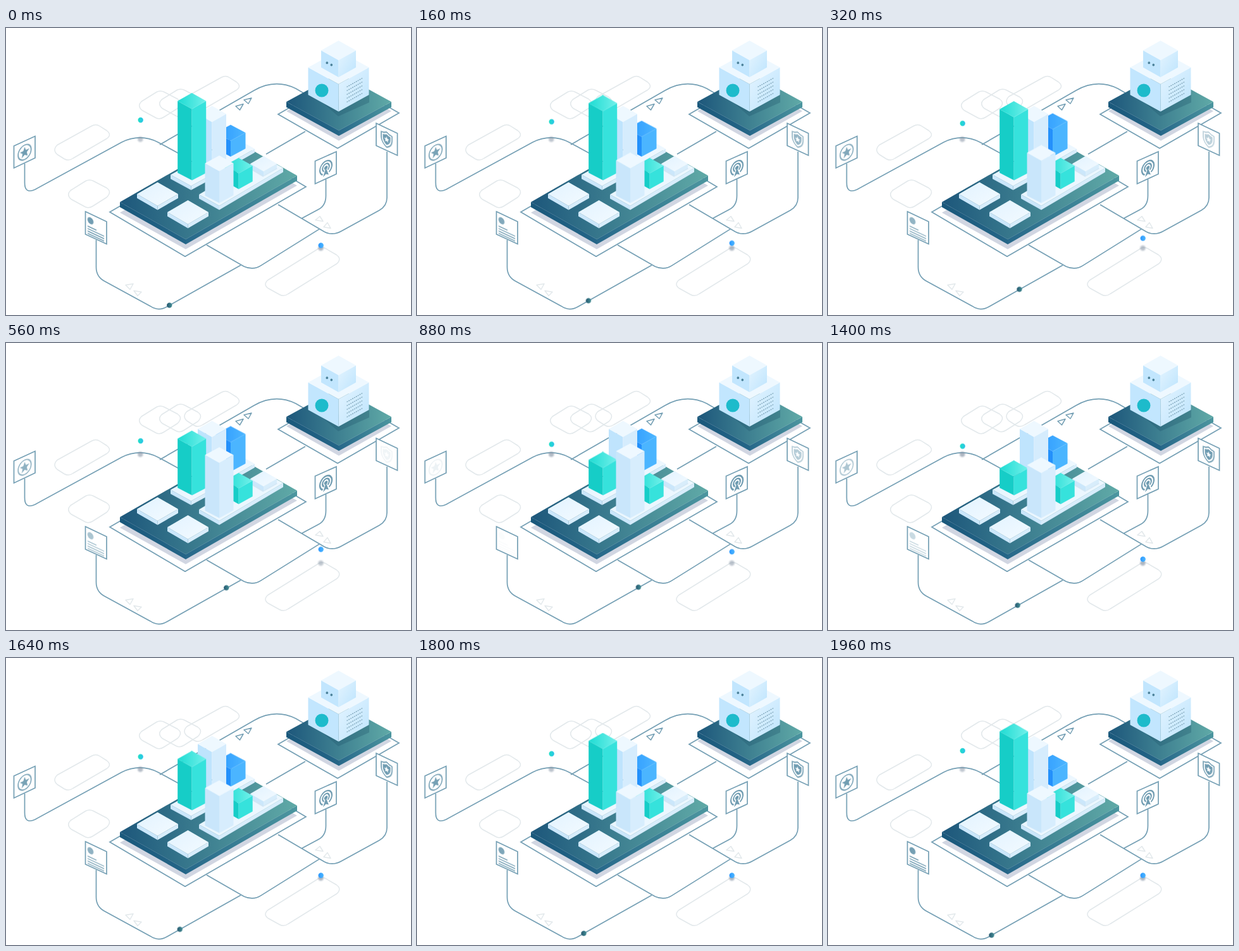
Animation, 640 px wide and 455 px high, one loop 2 s. Source, as an HTML page:

```html
<!DOCTYPE html>
<html lang="en">
<head>
<meta charset="utf-8">
<title>Isometric data platform</title>
<style>
html, body { margin: 0; width: 100%; height: 100%; overflow: hidden; background: #fff; }
svg { display: block; width: 640px; height: 455px; }
.wire { fill: none; stroke: #749fb4; stroke-width: 1.7; }
.panel { fill: #fff; stroke: #749fb4; stroke-width: 1.7; }
.faint { fill: none; stroke: #e2e8eb; stroke-width: 1.5; stroke-linejoin: round; }
.arrow { fill: none; stroke: #749fb4; stroke-width: 1.5; stroke-linejoin: round; }
.icon { fill: none; stroke: #719db2; stroke-width: 1.7; }
.icon .solid { fill: #719db2; stroke: none; }

/* Each keyframe step eases like half a cosine wave unless marked linear. */
.move { animation: 2s cubic-bezier(.37, 0, .63, 1) infinite; }
.even { animation: 2s linear infinite; }
.green { animation-name: green; }
.blue { animation-name: blue; }
.front { animation-name: front; }
.runner { animation-name: runner; }
.sinker { animation-name: sinker; }
.sinker-shade { animation-name: sinker-shade; }
.floater { animation-name: floater; }
.floater-shade { animation-name: floater-shade; }
.shield { animation-name: shield; }
.doc { animation-name: doc; }
.star { animation-name: star; }
.beacon { animation-name: beacon; }
@keyframes green { 0%, 100% { transform: none; } 64% { transform: translateY(89px); } }
@keyframes blue { 0%, 100% { transform: none; } 22% { transform: translateY(-22px); } }
@keyframes front { 0%, 100% { transform: none; } 38% { transform: translateY(-44px); } }
@keyframes runner { 0%, 100% { transform: none; } 34% { transform: translate(97px, -55.5px); } }
@keyframes sinker { 0%, 100% { transform: none; } 64% { transform: translateY(21.3px); } }
@keyframes sinker-shade { 0%, 100% { opacity: .5; } 64% { opacity: .7; } }
@keyframes floater { 0%, 82%, 100% { transform: none; } 27% { transform: translateY(-17.5px); } }
@keyframes floater-shade { 0%, 82%, 100% { opacity: .65; } 27% { opacity: .5; } }
@keyframes shield { 0%, 58%, 100% { opacity: 1; } 30% { opacity: .05; } }
@keyframes doc { 0%, 100% { opacity: 1; } 28% { opacity: .6; } 42%, 60% { opacity: .04; } 84% { opacity: .86; } }
@keyframes star { 0%, 100% { opacity: 1; } 28% { opacity: .8; } 42%, 58% { opacity: .14; } 80% { opacity: .95; } }
@keyframes beacon { 0%, 80%, 100% { stroke-width: 2px; } 28%, 56% { stroke-width: 2.4px; } }
</style>
</head>
<body>
<svg viewBox="0 0 640 455">
  <defs>
    <linearGradient id="deck"><stop stop-color="#1d577b"/><stop offset="1" stop-color="#60aaa7"/></linearGradient>
    <linearGradient id="deckL"><stop stop-color="#1a587b"/><stop offset="1" stop-color="#246587"/></linearGradient>
    <linearGradient id="deckR"><stop stop-color="#27688a"/><stop offset="1" stop-color="#4c969f"/></linearGradient>
    <linearGradient id="ice" x2="1" y2="1"><stop stop-color="#e2f3ff"/><stop offset="1" stop-color="#f3faff"/></linearGradient>
    <linearGradient id="frost" x2="1" y2="1"><stop stop-color="#e4f4ff"/><stop offset="1" stop-color="#bde4fd"/></linearGradient>
    <linearGradient id="mint"><stop stop-color="#1edcd3"/><stop offset="1" stop-color="#72f0ea"/></linearGradient>
    <linearGradient id="sky"><stop stop-color="#2b98ff"/><stop offset="1" stop-color="#4db6ff"/></linearGradient>
    <linearGradient id="dotTeal"><stop stop-color="#1fe0c6"/><stop offset="1" stop-color="#2cc3ea"/></linearGradient>
    <linearGradient id="dotDark"><stop stop-color="#24576f"/><stop offset="1" stop-color="#458f96"/></linearGradient>
    <filter id="soft" x="-1" y="-1" width="3" height="3"><feGaussianBlur stdDeviation="1.2"/></filter>
    <clipPath id="greenClip"><path d="M270 0H317V228.5L294 240.5L270 228Z"/></clipPath>
    <clipPath id="blueClip"><path d="M330 0H379V190L355 203L330 190Z"/></clipPath>
    <clipPath id="frontClip"><path d="M313 0H360V264L337 276.5L313 264Z"/></clipPath>
    <path id="pill" d="M4 32L58 2Q65 -2 71 2L82 9Q91 16 82 22L29 53Q22 58 15 54L4 47Q-4 40 4 32Z"/>
    <path id="tile" d="M3 17L27 2Q33 -1 39 2L60 13Q69 19 60 28L38 42Q32 46 26 43L4 31Q-4 24 3 17Z"/>
  </defs>

  <g class="faint" transform="translate(0 .5)">
    <use href="#pill" x="282" y="76"/>
    <use href="#pill" x="77" y="153"/>
    <use href="#tile" x="211" y="99"/>
    <use href="#tile" x="243" y="96"/>
    <use href="#tile" x="99" y="240"/>
    <path d="M414 399L491 351Q498 345 505 349L522 359Q531 365 523 373L446 421Q439 426 432 422L414 412Q406 406 414 399Z"/>
    <path d="M189 407L201 405L196 414ZM202 416L214 418L208 424ZM489 304L496 298L501 306ZM502 315L513 317L508 308Z"/>
  </g>
  <path class="arrow" d="M363 124L375 120.500L369.500 130ZM376 114L388 111L383 120Z"/>

  <g class="wire" transform="translate(0 .9)">
    <path d="M29.500 214V244Q29.500 263 46 255L183 180Q212 166 240 180L275 199"/>
    <path d="M243 184L392 98Q425 79 458 95L470 102"/>
    <path d="M411 199L473 163"/>
    <path d="M142.500 335V378Q142.500 393 155 400L228 440Q241 449 255 440.500L371 375"/>
    <path d="M317 343L376 377Q391 384 404 375L495 318"/>
    <path d="M430 279L503 322Q516 329 530 321L590 288Q602 281 602 268V195"/>
    <path d="M505.500 239V265Q505.500 281 493 287L467 301"/>
  </g>

  <g transform="translate(0 .7)">
    <path fill="#d1d6e2" d="M443 131L526 178L609 131L525 84ZM180 292L284 350L460 249L356 191Z"/>
    <path class="wire" d="M430 136L524 190L621 134L527 80ZM164 291L283 361.500L474 251L355 180Z"/>
  </g>

  <g class="panel">
    <path d="M12.500 187L46 171.500V206L12.500 222Z"/>
    <path d="M125.500 291L159 307V342.500L125.500 327Z"/>
    <path d="M488.500 211L522 196V231.500L488.500 247Z"/>
    <path d="M585 151L618.500 167V202L585 186.500Z"/>
  </g>
  <g class="icon even star" transform="matrix(1 -.47 0 1 29.500 197)">
    <ellipse rx="10.300" ry="11.500"/>
    <path class="solid" transform="scale(1.150)" d="M0 -7.500L1.800 -2.400L6.500 -2.300L2.900 1.100L4.100 6.500L0 3.500L-4.100 6.500L-2.900 1.100L-6.500 -2.300L-1.800 -2.400Z"/>
  </g>
  <g class="icon even doc" transform="matrix(1 .47 0 1 142 317)">
    <ellipse class="solid" cx="-8.500" cy="-7.500" rx="4.800" ry="5.200"/>
    <path d="M-13 3.200H1M-13 7H13M-13 10.800H13M-13 14.600H13"/>
  </g>
  <g class="icon even beacon" transform="matrix(1 -.47 0 1 505.500 221.500)">
    <path d="M-5 9A9.500 10.500 0 1 1 5 9M-3 4.700A5.300 6 0 1 1 3 4.700"/>
    <circle class="solid" r="2.800"/>
    <path class="solid" d="M-4.500 13L0 0L4.500 13L0 10Z"/>
  </g>
  <g class="icon even shield" transform="matrix(1 .47 0 1 601.500 176.500)">
    <path d="M0 -11.500Q4 -8.500 8.500 -8.500V0Q8 8 0 12.500Q-8 8 -8.500 0V-8.500Q-4 -8.500 0 -11.500Z"/>
    <path class="solid" d="M0 -8Q3 -6 6 -6V0Q5 6 0 9Q-5 6 -6 0V-6Q-3 -6 0 -8Z"/>
    <path fill="#fff" stroke="none" d="M0 -4.500L1.200 -1.300L4 -1L1.800 1L2.500 4.200L0 2.500L-2.500 4.200L-1.800 1L-4 -1L-1.200 -1.300Z"/>
  </g>

  <g id="server"></g>
  <g fill="#4b8199"><ellipse cx="507.300" cy="55.300" rx="1.800" ry="2"/><ellipse cx="514.300" cy="58.500" rx="1.800" ry="2"/></g>
  <circle cx="499" cy="99" r="10.500" fill="#1dbbcb"/>
  <path fill="none" stroke="#7fa5b9" stroke-width="1.300" stroke-dasharray="2 1.300"
    d="M538.500 93.500L564 79M538.500 99.500L564 85M538.500 105.500L564 91M538.500 111.500L564 97M538.500 117.500L564 103"/>

  <g transform="translate(0 .9)">
    <g id="deckTop"></g>
    <g clip-path="url(#blueClip)"><g class="move blue" id="blueBar"></g></g>
    <g id="middle"></g>
    <g clip-path="url(#greenClip)"><g class="move green" id="greenBar"></g></g>
    <g id="near"></g>
    <g clip-path="url(#frontClip)"><g class="move front" id="frontBar"></g></g>

    <circle class="even sinker-shade" cx="212.300" cy="175.500" r="4.300" fill="#8492a3" filter="url(#soft)"/>
    <circle class="even sinker" cx="212.700" cy="145" r="4.200" fill="url(#dotTeal)"/>
    <circle class="move floater-shade" cx="497.500" cy="348" r="4.300" fill="#8492a3" filter="url(#soft)"/>
    <circle class="move floater" cx="497.700" cy="343.800" r="4.200" fill="url(#sky)"/>
    <circle class="move runner" cx="258.300" cy="438.600" r="4.200" fill="url(#dotDark)"/>
  </g>
</svg>
<script>
// Fills are listed as top, left side, right side.
const DECK = ['url(#deck)', 'url(#deckL)', 'url(#deckR)'];
const PAD = ['url(#ice)', '#cbe7fb', '#d8edfb'];
const CASE = ['#eef8ff', '#c2e6fe', 'url(#frost)'];
const WHITE = ['#eef8ff', '#bfe4fd', '#d5ecfd'];
const PALE = ['#eef8ff', '#c9e6fb', '#d7edfd'];
const MINT = ['url(#mint)', '#16cdc7', '#36e2dc'];
const SKY = ['url(#sky)', '#2390fb', '#4bb5ff'];

const face = (fill, ...pts) => `<polygon fill="${fill}" points="${pts.join(' ')}"/>`;

// Slab from its left, front and right top corners, and its height.
function slab(l, f, r, h, [top, left, right]) {
  const down = ([x, y]) => [x, y + h];
  const back = [l[0] + r[0] - f[0], l[1] + r[1] - f[1]];
  return face(left, l, f, down(f), down(l)) +
    face(right, f, r, down(r), down(f)) +
    face(top, l, back, r, f);
}

// Upright box from its back top corner, half width and half depth.
const box = (x, y, w, d, h, fills) =>
  slab([x - w, y + d], [x, y + 2 * d], [x + w, y + d], h, fills);

const put = (id, ...parts) => {
  document.getElementById(id).innerHTML = parts.join('');
};

put('server',
  slab([443, 117], [526, 162.5], [609, 117], 8.5, DECK),
  face('rgba(28,80,105,.3)', [500, 118], [525, 140], [574, 118], [574, 104]),
  box(525.5, 36, 48, 26.5, 43.5, CASE),
  box(525.5, 20, 27.5, 15.5, 27, CASE));

put('deckTop',
  slab([180, 275], [284, 334], [460, 233], 8, DECK),
  box(239.5, 243.5, 32.5, 18.8, 6.5, PAD),
  box(287.5, 272, 32.5, 19, 6.5, PAD),
  slab([290, 213], [322, 231], [393, 190.5], 6, PAD));

put('blueBar', box(355, 152.5, 23.5, 12.6, 90, SKY));
put('middle',
  box(325.5, 122.4, 22.5, 12.8, 72, WHITE),
  box(292.5, 214, 32.5, 17.8, 6.5, PAD));
put('greenBar', box(293.7, 102, 22.5, 12.8, 130, MINT));
put('near',
  slab([305, 263], [337, 281], [438, 221], 6.5, PAD),
  face('rgba(150,190,215,.3)', [386, 223], [406, 235], [429, 222], [409, 210]),
  box(407, 202, 21, 12.2, 7, PAD),
  box(367.7, 205, 22, 12.2, 25, MINT));
put('frontBar', box(337, 201.3, 22.5, 12.3, 140, PALE));
</script>
</body>
</html>
```
